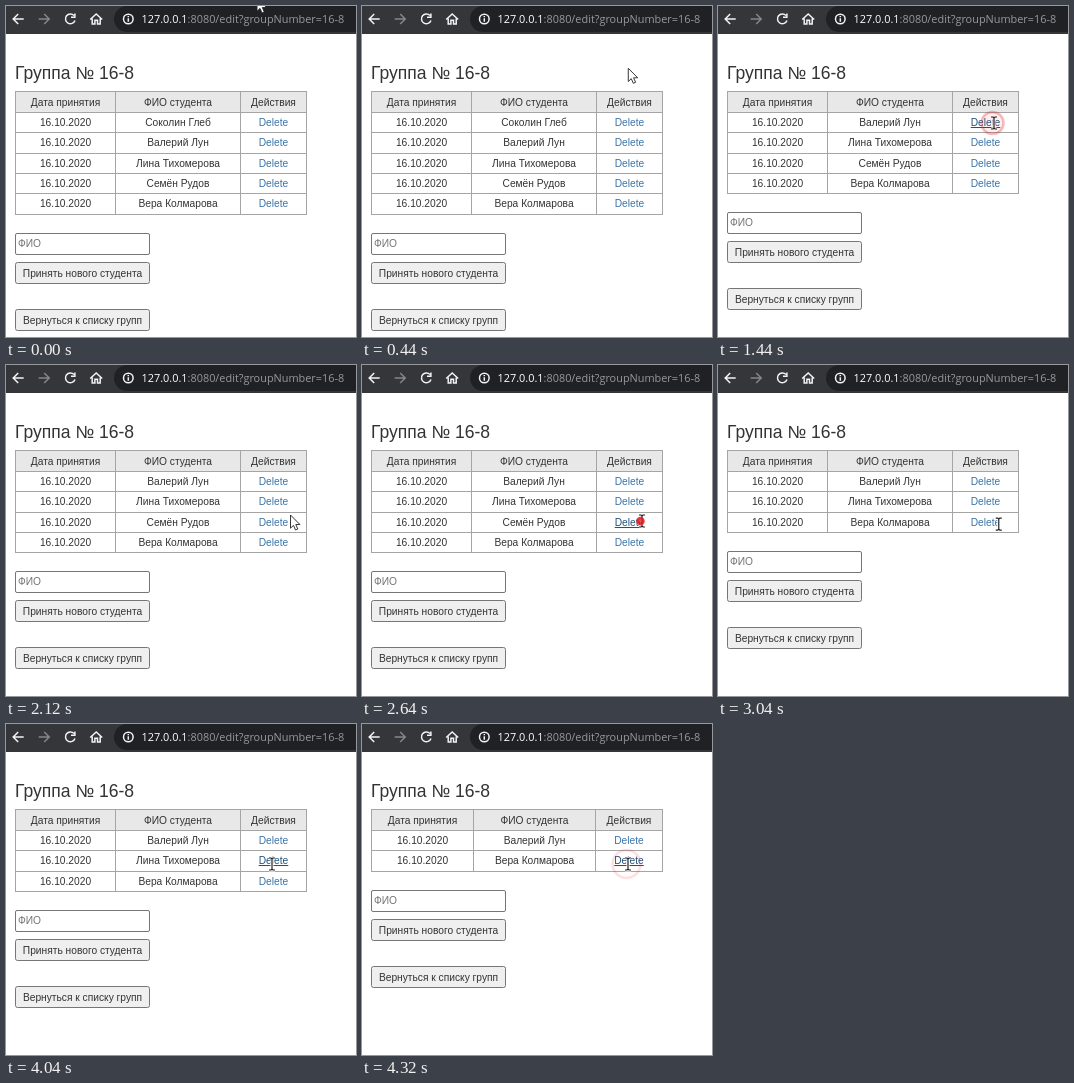
An HTML page that plays this animation: 350 px wide and 331 px high, repeating every 4360 ms.

```html
<!DOCTYPE html>
<html lang="ru">
<head>
<meta charset="utf-8">
<title>Группа</title>
<style>
html, body { margin: 0; width: 100%; height: 100%; overflow: hidden; background: #fff; }
svg { display: block; width: 350px; height: 331px; }
text { font: 10.22px "Liberation Sans", Arial, sans-serif; fill: #333; }
.mid { text-anchor: middle; }
.title { font-size: 17.52px; }
.url { font: 10.9px "Open Sans", "Noto Sans", sans-serif; fill: #969a9f; }
.host { fill: #fff; font-weight: 500; }
.link { fill: #3a74a9; }
.hover { fill: #23527c; text-decoration: underline; }
.hint { fill: #757575; }
.field { fill: #fff; stroke: #767676; }
.button { fill: #efefef; stroke: #767676; }
.icon { fill: none; stroke: #f1f3f4; stroke-width: 1.5; }
.dim { stroke: #85878b; }
</style>
</head>
<body>
<svg viewBox="0 0 350 331">
  <rect width="350" height="28" fill="#35363a"/>
  <rect x="108" y="0" width="270" height="26" rx="13" fill="#202124"/>
  <g transform="translate(-0.8 0)">
    <path class="icon" d="M18.500 13H8.500M13 8L8 13L13 18"/>
    <path class="icon dim" d="M33.500 13H43.500M39 8L44 13L39 18"/>
    <path class="icon" d="M68.800 9.500A4.900 4.900 0 1 0 69.800 14.500M69.700 7.500V11.300H65.800"/>
    <path class="icon" d="M85 13.500L91 8L97 13.500M87 12.500V18H89.700V14.200H92.300V18H95V12.500"/>
  </g>
  <circle class="icon" cx="122.300" cy="13" r="4.800"/>
  <path class="icon" d="M122.300 12.300V15.700M122.300 10V11.300"/>
  <text class="url" x="135.500" y="17"><tspan class="host">127.0.0.1</tspan>:8080/edit?groupNumber=16-8</text>
  <text class="title" x="9" y="73">Группа № 16-8</text>
  <g id="table"></g>
  <g id="form">
    <rect class="field" x="9.500" y="227.500" width="134" height="21" rx="1.500"/>
    <text class="hint" x="12" y="241">ФИО</text>
    <rect class="button" x="9.500" y="256.500" width="134" height="21" rx="2"/>
    <text class="mid" x="76.500" y="270.500">Принять нового студента</text>
    <rect class="button" x="9.500" y="303.500" width="134" height="21" rx="2"/>
    <text class="mid" x="76.500" y="317.500">Вернуться к списку групп</text>
  </g>
  <path id="arrow" d="M0 0V13.200L3 10.400L5 15L7.300 14L5.300 9.500H9.400Z" fill="#fff" stroke="#222" stroke-width="0.900"/>
  <g id="beam" fill="none">
    <path d="M-3-6H-1L0-5L1-6H3M0-5V5M-3 6H-1L0 5L1 6H3" stroke="#fff" stroke-width="3"/>
    <path d="M-3-6H-1L0-5L1-6H3M0-5V5M-3 6H-1L0 5L1 6H3" stroke="#222" stroke-width="1.200"/>
  </g>
  <circle id="ring" stroke="#e51c23" fill="#e51c23"/>
</svg>
<script>
const LOOP = 4360, STEP = 40, PITCH = 20.4, TOP = 85.85;
const $ = id => document.getElementById(id);
const students = ['Соколин Глеб', 'Валерий Лун', 'Лина Тихомерова', 'Семён Рудов', 'Вера Колмарова'];
// Click time and the student it removes.
const clicks = [[1240, 0], [2600, 3], [4060, 2]];
const RELOAD = 120;
// Pointer path: time, x, y.
const path = [
  [0, 251, -8], [320, 262, 40], [600, 272, 92], [880, 275, 116], [1440, 276, 117],
  [1680, 304, 126], [1840, 306, 134], [2120, 284.5, 150], [2400, 280, 156],
  [2840, 280, 156], [3100, 281, 160], [3600, 281, 160], [3920, 266, 140], [LOOP, 266, 140]
];

function pointer(t) {
  const i = path.findIndex(p => p[0] > t);
  const [a, b] = [path[i - 1], path[i]];
  const k = (t - a[0]) / (b[0] - a[0]);
  return [a[1] + (b[1] - a[1]) * k, a[2] + (b[2] - a[2]) * k];
}

const snap = row => Math.floor(TOP + row * PITCH) + 0.5;
const cell = (x, y, text, style = '') => `<text class="mid ${style}" x="${x}" y="${y}">${text}</text>`;

function table(names, hovered) {
  const wide = names.includes(students[2]);
  const cols = wide ? [9.5, 109.5, 234.5, 300.5] : [9.5, 111.5, 233.5, 300.5];
  const mids = [0, 1, 2].map(i => (cols[i] + cols[i + 1]) / 2);
  const bottom = snap(names.length + 1);
  let lines = cols.map(x => `M${x} ${snap(0)}V${bottom}`).join('');
  for (let r = 0; r <= names.length + 1; r++) lines += `M9 ${snap(r)}H301`;
  let out = `<rect x="9.5" y="${snap(0)}" width="291" height="${PITCH}" fill="#e8e8e8"/>
    <path d="${lines}" stroke="#a5a5a5" fill="none"/>`;
  ['Дата принятия', 'ФИО студента', 'Действия'].forEach((s, i) => out += cell(mids[i], 99.5, s));
  names.forEach((name, r) => {
    const y = snap(r + 1) + 13.5;
    out += cell(mids[0], y, '16.10.2020') + cell(mids[1], y, name)
      + cell(mids[2], y, 'Delete', r === hovered ? 'hover' : 'link');
  });
  return out;
}

let shown = '';
function draw(now) {
  const t = Math.floor(now % LOOP / STEP) * STEP;
  const [x, y] = pointer(t);
  const gone = clicks.filter(c => t >= c[0] + RELOAD).map(c => c[1]);
  const names = students.filter((_, i) => !gone.includes(i));
  const row = names.findIndex((_, r) => Math.abs(y - (116 + r * PITCH)) < 6);
  const hovered = x > 252 && x < 280.5 ? row : -1;
  const state = names.length + ':' + hovered;
  if (state !== shown) {
    shown = state;
    $('table').innerHTML = table(names, hovered);
    const rise = snap(names.length + 1) - snap(students.length + 1);
    $('form').setAttribute('transform', `translate(0 ${rise})`);
  }

  const overText = row >= 0 && x > 250 && x < 283;
  for (const id of ['arrow', 'beam']) {
    $(id).setAttribute('transform', `translate(${x} ${y})`);
    $(id).style.display = (id === 'beam') === overText ? '' : 'none';
  }

  const click = clicks.find(c => t >= c[0] && t < c[0] + 340);
  const ring = $('ring');
  ring.style.display = click ? '' : 'none';
  if (click) {
    const age = t - click[0], fade = 1 - age / 340;
    const attrs = {
      cx: x - 1.5, cy: y, r: 1 + age * 0.05, 'stroke-width': 2.5,
      'stroke-opacity': fade ** 1.4, 'fill-opacity': fade ** 3
    };
    for (const k in attrs) ring.setAttribute(k, attrs[k]);
  }
  requestAnimationFrame(() => draw(performance.now() - start));
}
const start = performance.now();
draw(0);
</script>
</body>
</html>
```
